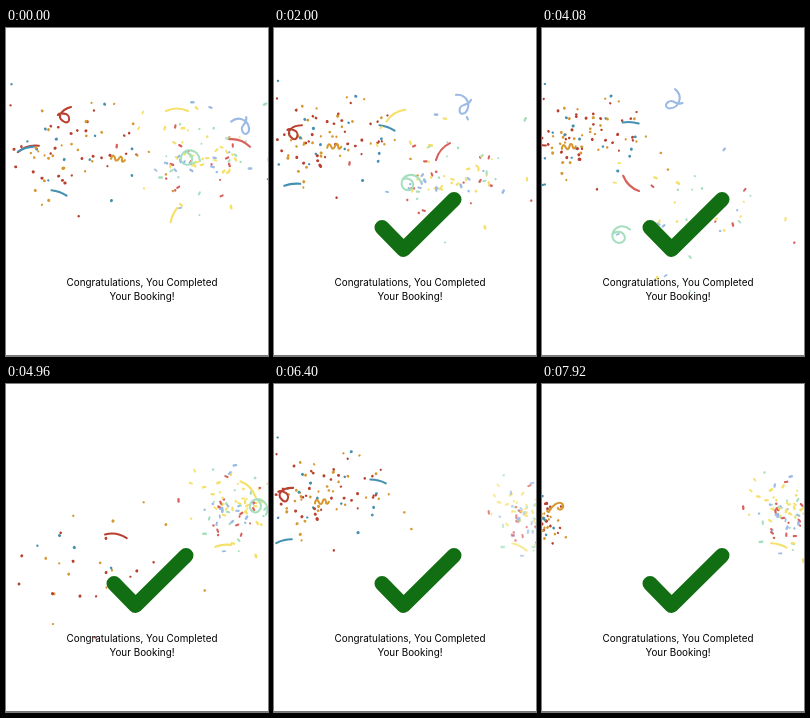
Recreate the animation shown at these times as an HTML page with a canvas. Size 262 by 328 pixels, loop 8000 ms.

```html
<!DOCTYPE html>
<html lang="en">
<head>
<meta charset="utf-8">
<title>Booking completed</title>
<style>
html, body { margin: 0; width: 100%; height: 100%; overflow: hidden; background: #fff; }
canvas { display: block; width: 262px; height: 328px; }
</style>
</head>
<body>
<canvas id="stage"></canvas>
<script>
const W = 262, H = 328, LOOP = 8000, STEP = 80;
const canvas = document.getElementById('stage');
const ctx = canvas.getContext('2d');
const dpr = window.devicePixelRatio || 1;
canvas.width = W * dpr;
canvas.height = H * dpr;

const clamp = v => Math.max(0, Math.min(1, v));

function seeded(seed) {
  return () => {
    seed = (seed * 1664525 + 1013904223) % 4294967296;
    return seed / 4294967296;
  };
}

const RED = '#b9402f', ORANGE = '#d6982f', BLUE = '#4590b0';
const ROSE = '#d9605c', YELLOW = '#f5e06a', MINT = '#a6dfbd', SKY = '#9cbbe4';

const ARC = new Path2D('M-11 1Q0-4 11 1');
const LINE = new Path2D('M-8 0Q0-2 8 0');
const WAVE = new Path2D('M-7 1C-6-4-4-3-3 0S0 2 1-1S4-3 4 0S6 2 7 0');
const CURL = new Path2D('M-9 0C-3-4 6-5 7 0C7 5 0 5 1 1');
const LOOPED = new Path2D('M5-9C-6-6-9 2-3 5C4 10 5 0 0-2C-4-3-7-3-8-1');
const HOOK = new Path2D('M10 5C9-8-7-9-9 1C-10 9 1 12 2 4C3-1-2-4-6-4');
const SWIRL = new Path2D('M-7-9C4-10 9 2 2 9C-5 13-5 2 1 1C4 0 6 0 8-4');

// A streamer passes (x, y) at age `at` with the given velocity and turn in degrees.
const streamer = (path, color, at, x, y, vx, vy, turn, spin, end) =>
  ({ path, color, at, x, y, vx, vy, turn, spin, end });

const left = {
  age: time => (time + 1057) % 2227 / 1000,
  x: -12, y: 140, jitter: 11, vx: -1, tau: 1.2, gravity: 56,
  speed: [125, 70], lift: [-140, 38], life: [.9, .95],
  count: 95, seed: 41, size: 2, dashes: 0, fadeIn: .01,
  colors: [RED, RED, ORANGE, ORANGE, BLUE],
  streamers: [
    streamer(CURL, ORANGE, .19, 35, 125, 170, 30, 0, 250, .5),
    streamer(WAVE, ORANGE, 1.057, 112, 131, 228, 88, 10, 45, 1.4),
    streamer(LOOPED, RED, 1.057, 60, 88, 172, -40, 0, -60, 1.4),
    streamer(LINE, BLUE, .83, 113, 100, 165, 56, 20, 110, 1),
    streamer(LINE, BLUE, 1.057, 53, 165, 153, 70, 20, 120, 1.4),
    streamer(ARC, RED, 1.057, 22, 120, 174, -14, -17, 53, 1.8),
    streamer(LINE, BLUE, 1.057, 20, 121, 174, -14, -17, 53, 1.35)
  ]
};

const rightStarts = [-675, 1090, 2885, 4625, 6260, 7720];
const right = {
  age: time => (time - rightStarts.filter(s => s <= time).pop()) / 1000,
  x: 272, y: 140, jitter: 16, tau: 1.5, gravity: 92,
  speed: [-220, 65], lift: [-157, 50], life: [.85, .7],
  count: 88, seed: 77, size: 1.7, dashes: .65, fadeIn: .2,
  colors: [YELLOW, YELLOW, MINT, SKY, ROSE],
  streamers: [
    streamer(ARC, YELLOW, .675, 171, 82, -211, -15, 0, -135, 1.15),
    streamer(LINE, YELLOW, .675, 168, 187, -145, 125, -65, -170, .88),
    streamer(HOOK, MINT, .675, 184, 128, -205, 70, 0, -85, 1.3),
    streamer(SWIRL, SKY, .675, 236, 97, -200, -125, -35, 150, 1.35),
    streamer(ARC, ROSE, .675, 234, 114, -280, 3, 20, -300, 1.2)
  ]
};

function makePieces(b) {
  const rnd = seeded(b.seed);
  const spread = () => (rnd() + rnd() + rnd() + rnd() - 2) * 1.73;
  b.pieces = Array.from({ length: b.count }, (_, i) => ({
    x: b.x + b.jitter * spread(),
    y: b.y + b.jitter * spread(),
    vx: b.speed[0] + b.speed[1] * spread(),
    vy: b.lift[0] + b.lift[1] * spread(),
    life: b.life[0] + b.life[1] * rnd(),
    size: b.size + rnd(),
    angle: rnd() * Math.PI,
    spin: (rnd() - .5) * 9,
    half: rnd() < b.dashes ? 1.2 : .15,
    color: b.colors[i % b.colors.length]
  }));
}

function drawPiece(p, b, age) {
  const reach = b.tau * 0 + 1 - Math.exp(-age / b.tau);
  const x = p.x + p.vx * reach;
  const y = p.y + p.vy * reach + b.gravity * age * age;
  const turn = p.angle + p.spin * age;
  const dx = Math.cos(turn) * p.half, dy = Math.sin(turn) * p.half;
  ctx.strokeStyle = p.color;
  ctx.lineWidth = p.size;
  ctx.beginPath();
  ctx.moveTo(x - dx, y - dy);
  ctx.lineTo(x + dx, y + dy);
  ctx.stroke();
}

function drawStreamer(s, age) {
  const dt = age - s.at;
  ctx.save();
  ctx.translate(s.x + s.vx * dt, s.y + s.vy * dt + 150 * dt * dt);
  ctx.rotate((s.turn + s.spin * dt) * Math.PI / 180);
  ctx.strokeStyle = s.color;
  ctx.lineWidth = 2.1;
  ctx.stroke(s.path);
  ctx.restore();
}

function drawBurst(b, time) {
  const age = b.age(time);
  ctx.lineCap = ctx.lineJoin = 'round';
  ctx.globalAlpha = clamp(age / b.fadeIn);
  b.pieces.filter(p => age < p.life).forEach(p => drawPiece(p, b, age));
  b.streamers.filter(s => age < s.end).forEach(s => drawStreamer(s, age));
  ctx.globalAlpha = 1;
}

function drawCheck(time) {
  const p = clamp(time / 640);
  if (!p) return;
  const length = 102, shown = length * (1 - (1 - p) ** 3);
  ctx.strokeStyle = '#126e12';
  ctx.lineWidth = 15;
  ctx.setLineDash([shown, length * 2]);
  ctx.beginPath();
  ctx.moveTo(108, 199.5);
  ctx.lineTo(129.5, 221.5);
  ctx.lineTo(180, 171.5);
  ctx.stroke();
  ctx.setLineDash([]);
}

function drawText() {
  ctx.fillStyle = '#000';
  ctx.font = '9.9px Inter, sans-serif';
  ctx.textAlign = 'center';
  ctx.fillText('Congratulations, You Completed', 136, 258);
  ctx.fillText('Your Booking!', 136, 272);
}

function frame(now) {
  const time = Math.floor((now % LOOP + .5) / STEP) * STEP % LOOP;
  ctx.setTransform(dpr, 0, 0, dpr, 0, 0);
  ctx.fillStyle = '#fff';
  ctx.fillRect(0, 0, W, H);
  drawBurst(left, time);
  drawBurst(right, time);
  drawCheck(time);
  drawText();
  ctx.fillStyle = '#777';
  ctx.fillRect(0, H - 1, W, 1);
  requestAnimationFrame(frame);
}

makePieces(left);
makePieces(right);
frame(performance.now());
</script>
</body>
</html>
```
